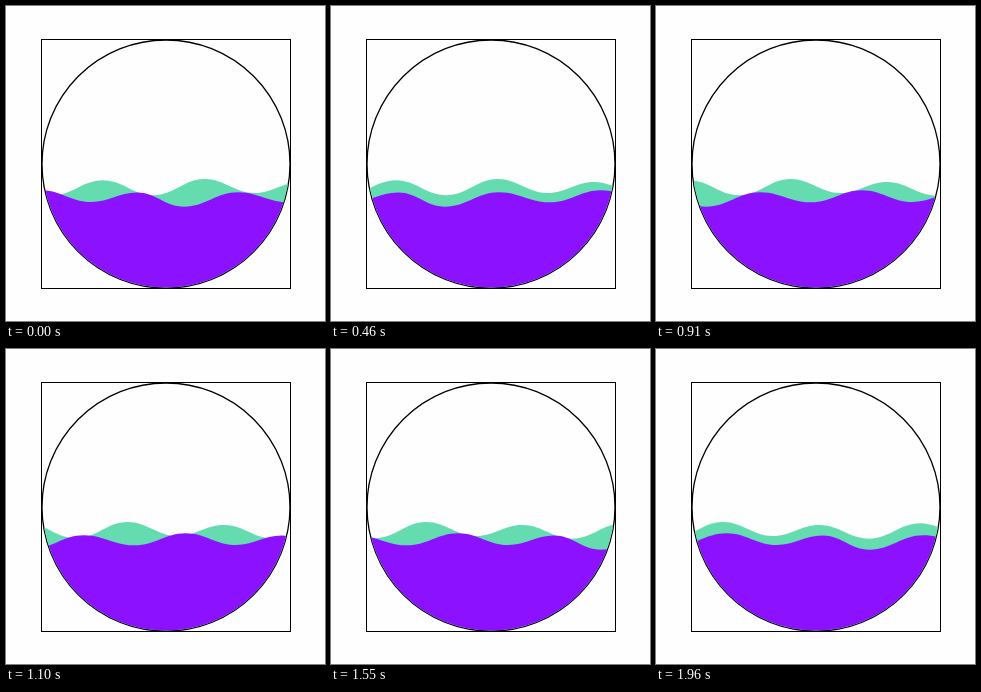
An HTML page that plays this animation: 319x315 px, repeating every 2.06 s.

```html
<!DOCTYPE html>
<html lang="en">
<head>
<meta charset="utf-8">
<title>Waves in a circle</title>
<style>
  html, body { margin: 0; width: 100%; height: 100%; overflow: hidden; background: #fefefe; }
  svg { display: block; }
  .outline { fill: none; stroke: #000; }
  .wave { animation: drift 2060ms infinite; }
  #back { --step: -1.882px; fill: #65dbb0; }
  #front { --step: -3.764px; fill: #8c11ff; }

  /* Stepped drift with a short stall, then a hold before the cut back */
  @keyframes drift {
    0% { transform: translateX(0); animation-timing-function: steps(43, end); }
    55.524% { transform: translateX(calc(var(--step) * 43)); animation-timing-function: linear; }
    59.748% { transform: translateX(calc(var(--step) * 43)); animation-timing-function: steps(27, end); }
    94.612%, 100% { transform: translateX(calc(var(--step) * 70)); }
  }
</style>
</head>
<body>
<svg width="319" height="315" viewBox="0 0 319 315">
  <defs>
    <clipPath id="bowl"><circle cx="160" cy="158" r="123.6"/></clipPath>
  </defs>
  <rect class="outline" x="35.5" y="33.5" width="249" height="249"/>
  <circle class="outline" cx="160" cy="158" r="124" stroke-width="1.3"/>
  <g clip-path="url(#bowl)">
    <path id="back" class="wave"/>
    <path id="front" class="wave"/>
  </g>
</svg>
<script>
  const period = 299, floor = 300, ease = 0.4;

  // Draws a periodic wave through one period of crests and troughs
  function drawWave(id, turns) {
    const points = [-1, 0, 1].flatMap(n => turns.map(([x, y]) => [x + n * period, y]));
    let [x, y] = points[0];
    let d = `M${x},${floor}V${y}`;
    for (const [nx, ny] of points.slice(1)) {
      const pull = (nx - x) * ease;
      d += `C${x + pull},${y} ${nx - pull},${ny} ${nx},${ny}`;
      [x, y] = [nx, ny];
    }
    document.getElementById(id).setAttribute('d', `${d}V${floor}Z`);
  }

  drawWave('back', [[97, 174.3], [147, 189.3], [198.5, 173], [248.5, 187], [295, 176], [344.5, 189.7]]);
  drawWave('front', [[35, 184.2], [85, 196], [131, 186.5], [178, 200.7], [232, 186.3], [283, 196.3]]);
</script>
</body>
</html>
```
